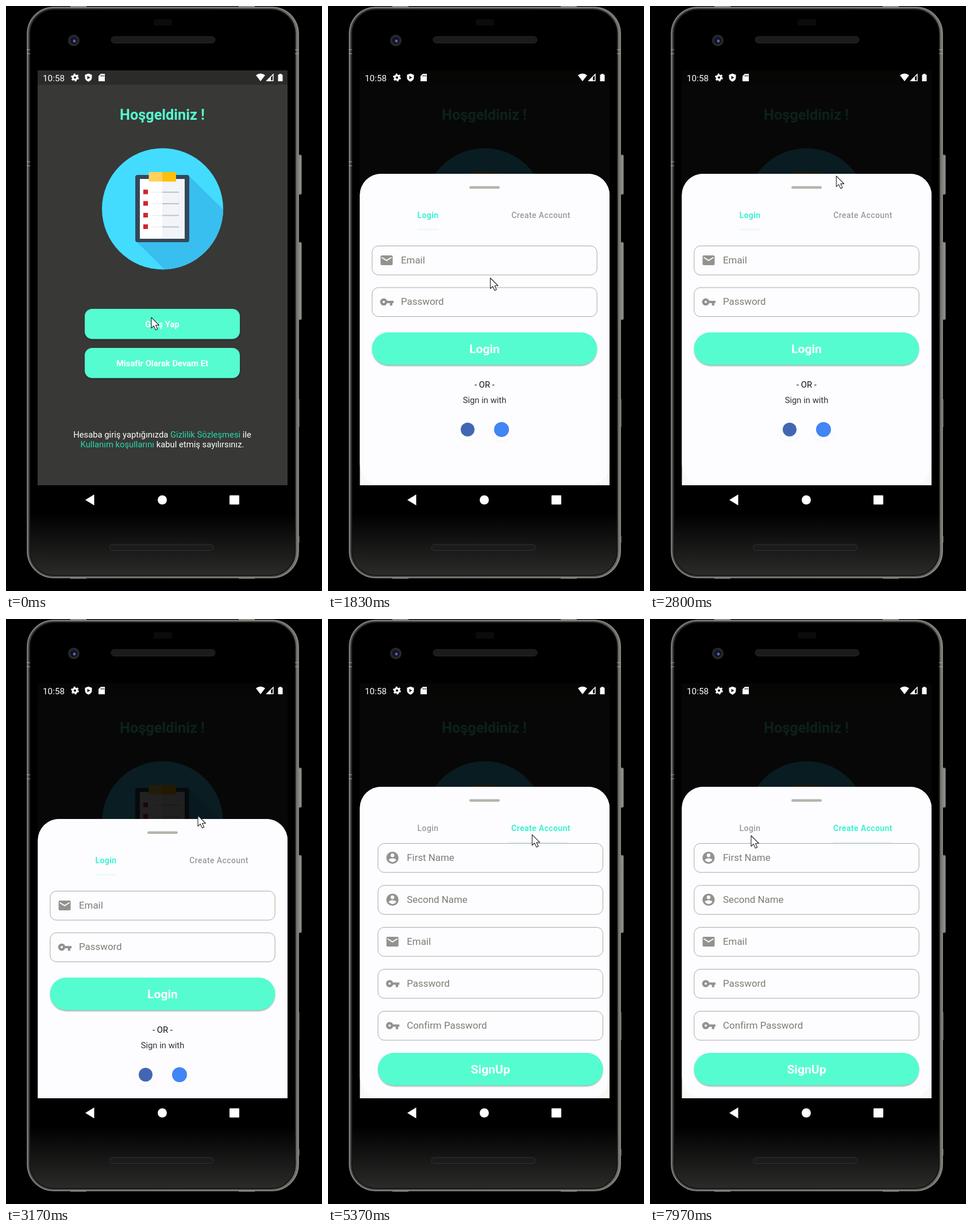
Recreate the animation shown at these times as an HTML page. Size 550 px wide and 1018 px high, loop 8000 ms.

```html
<!DOCTYPE html>
<html lang="tr">
<head>
<meta charset="utf-8">
<title>Login sheet</title>
<style>
  html, body { margin: 0; width: 100%; height: 100%; overflow: hidden; background: #000; }
  svg { display: block; width: 100vw; height: 100vh; font-family: Roboto, "Noto Sans", sans-serif; }
  .mid { text-anchor: middle; }
  .body { font-size: 14.8px; }
  .bold { font-weight: 700; }
  .hint { font-size: 16.9px; fill: #7d7d75; }
  .tab { font-size: 14px; letter-spacing: .4px; }
  .big { font-size: 21.1px; font-weight: 700; fill: #fff; }
</style>
</head>
<body>
<svg id="stage" viewBox="0 0 550 1018"></svg>
<script>
const MINT = '#55fcd0', GREY = '#92928f', SHEET_H = 542, LOOP = 8000;

const rect = (x, y, w, h, r, attrs) => `<rect x="${x}" y="${y}" width="${w}" height="${h}" rx="${r}" ${attrs}/>`;
const fill = c => `fill="${c}"`;
const text = (x, y, cls, str, attrs = '') => `<text x="${x}" y="${y}" class="${cls}" ${attrs}>${str}</text>`;

const icons = {
  mail: y => rect(91.5, y - 8.5, 21, 17, 2, fill(GREY)) +
    `<path d="M93.5 ${y - 5}l8.5 5.4 8.5-5.4" fill="none" stroke="#fdfcff" stroke-width="2"/>`,
  key: y => `<circle cx="97" cy="${y}" r="4.2" fill="none" stroke="${GREY}" stroke-width="4.2"/>
    <path d="M102 ${y - 2.1}h12v4.2h-2.1v4.2h-4.2v-4.2h-5.7z" fill="${GREY}"/>`,
  user: y => `<circle cx="102" cy="${y}" r="10.6" fill="${GREY}"/>
    <circle cx="102" cy="${y - 4.2}" r="3.2" fill="#fdfcff"/>
    <path d="M95.6 ${y + 4.2}c0-4.4 12.8-4.4 12.8 0q-6.4 7-12.8 0z" fill="#fdfcff"/>`
};

const field = (y, icon, label) =>
  rect(76.8, y + .5, 391.4, 50.5, 11, 'fill="none" stroke="#aaa99f"') +
  icons[icon](y + 25.5) + text(127, y + 30.5, 'hint', label);

const pill = (y, label) =>
  rect(77, y + 2, 391, 56.5, 28, 'fill="#9ab5ab" filter="url(#soft)"') +
  rect(76.5, y, 392, 56.5, 28, fill(MINT)) + text(272.5, y + 35.8, 'big mid', label);

const button = (y, label) =>
  rect(138, y + 2, 269, 52, 13, 'fill="#1d2a26" filter="url(#soft)"') +
  rect(137, y, 270, 52.5, 13, fill(MINT)) +
  text(272, y + 32, 'body bold mid', label, fill('#fff'));

const badge = (x, r, color) =>
  `<circle cx="${x}" cy="738" r="19.5" fill="#eaeeee" filter="url(#soft)"/>
   <circle cx="${x}" cy="737" r="20" fill="#fdfcff"/><circle cx="${x}" cy="737" r="${r}" fill="${color}"/>`;

const sideKey = (y, h) => rect(508, y, 6.5, h, 2, 'fill="#8d8d88" stroke="#4a4a48"');

const phone = () => `
  ${sideKey(259, 69)}${sideKey(411, 135)}
  ${rect(507, 684, 4, 49, 1, fill('#4c4c4a'))}${rect(507, 922, 4, 12, 1, fill('#4c4c4a'))}
  ${rect(36, 1, 474, 995, 47, 'fill="url(#metal)"')}
  ${rect(37.5, 2.5, 471, 992, 45.5, 'fill="none" stroke="#8b8b86" stroke-width="1.5"')}
  ${rect(41.5, 6, 462, 985, 42, 'fill="url(#glass)" stroke="#161616" stroke-width="2"')}
  <path d="M36 76h6m-6 7h6m-6 188h6m-6 7h6M503 76h7m-7 7h7" stroke="#a5a5a0"/>
  <path d="M112 1h28M405 1h28M112 995.5h28M405 995.5h28" stroke="#8b8b86" stroke-width="2"/>
  ${rect(257, 23, 32, 11, 3, fill('#0b0b0c'))}
  ${rect(183, 53, 181, 11.5, 5.7, 'fill="#1b1b1b" stroke="#272727"')}
  ${rect(180, 937, 181, 10.5, 5.2, 'fill="#1b1b1b" stroke="#323232"')}
  <circle cx="118" cy="60" r="10" fill="#29292b"/><circle cx="118" cy="60" r="6.5" fill="#131429"/>
  <circle cx="119" cy="61" r="2.4" fill="#5866a8"/>
  ${rect(55, 834, 435, 50, 0, fill('#000'))}
  <path d="M153.5 850v19l-15.5-9.5z" fill="#fff"/><circle cx="272" cy="859.5" r="8" fill="#fff"/>
  ${rect(389, 851.5, 17, 16, 1, fill('#fff'))}`;

const clipboard = () => `
  <circle cx="272.5" cy="353" r="105.5" fill="#43dcff"/>
  <path d="M319 296l120 118-80 80h-47l-86-85z" fill="#39bef0" clip-path="url(#disc)"/>
  ${rect(225, 294, 94, 117, 4, fill('#34485a'))}
  ${rect(233, 301, 39.5, 104, 0, fill('#fff'))}${rect(272, 301, 39, 104, 0, fill('#f1f4f8'))}
  ${rect(248.5, 289, 24, 16.5, 0, fill('#ffd15c'))}${rect(272, 289, 24, 16.5, 0, fill('#fdbf09'))}
  ${[323.5, 343.5, 364, 384].map(y => rect(239, y - 4, 8, 8, 0, fill('#d0262d')) +
    `<path d="M253 ${y + .5}h19" stroke="#e4e6ea"/><path d="M272 ${y + .5}h29" stroke="#bfc2c5" stroke-width="2"/>`).join('')}`;

const welcome = () => `
  ${rect(55, 112, 435, 722, 0, fill('#383836'))}${rect(55, 112, 435, 25, 0, fill('#2b2b2a'))}
  ${text(272, 198, 'bold mid', 'Hoşgeldiniz !', `font-size="25.3" fill="${MINT}"`)}
  ${clipboard()}
  ${button(527, 'Giriş Yap')}${button(595, 'Misafir Olarak Devam Et')}
  <g clip-path="url(#btn)"><circle id="ripple" cx="258" cy="560" fill="#fff"/></g>
  <g fill="#fff">
  ${text(272, 750.5, 'body mid', 'Hesaba giriş yaptığınızda <tspan fill="#27d9ad">Gizlilik Sözleşmesi</tspan> ile')}
  ${text(272, 767.5, 'body mid', '<tspan fill="#27d9ad">Kullanım koşullarını</tspan> kabul etmiş sayılırsınız.')}
  </g>`;

const statusBar = () => `<g fill="#fff">
  ${text(64, 130.5, '', '10:58', 'font-size="15.3"')}
  <circle cx="120" cy="124.5" r="3.7" fill="none" stroke="#fff" stroke-width="3.2"/>
  <circle cx="120" cy="124.5" r="5.9" fill="none" stroke="#fff" stroke-width="2" stroke-dasharray="3.09"/>
  <path d="M143.5 117.5l6 2.3v4.5q0 5-6 7.5-6-2.5-6-7.5v-4.5z"/>
  <path d="M141.5 121.5v6l5-3z" fill="#222"/>
  <path d="M165 118h7v13h-11v-9z"/><path d="M165.5 120v3m2.3-3v3m2.3-3v3" stroke="#222"/>
  <path d="M435 120.5q8-6 16 0l-8 10.500z"/>
  <path d="M465 119v11h-11z" fill="none" stroke="#fff" stroke-width="1.5"/><path d="M461 123v8h-7z"/>
  <path d="M473.5 119.5h2v-1.5h4v1.5h2v11.5h-8z"/></g>`;

const loginForm = () => `${field(417, 'mail', 'Email')}${field(489.5, 'key', 'Password')}${pill(568, 'Login')}
  ${text(272.5, 663.5, 'body mid', '- OR -', fill('#111'))}${text(272.5, 691, 'body mid', 'Sign in with', fill('#333'))}
  ${badge(243, 12, '#4267b2')}${badge(302, 13, '#4285f4')}`;

const signupForm = () => [['user', 'First Name'], ['user', 'Second Name'], ['mail', 'Email'],
  ['key', 'Password'], ['key', 'Confirm Password']].map(([icon, label], i) => field(390 + 73 * i, icon, label)).join('') +
  pill(755, 'SignUp');

const sheet = () => `
  <path d="M55.5 834V329a37 37 0 0 1 37-37H453a37 37 0 0 1 37 37V834z" fill="#f8f9f5"/>
  ${rect(55.5, 292, 434.5, SHEET_H, 37, fill('#fdfcff'))}
  ${rect(246, 313.5, 53, 4.5, 2.2, fill('#b5b5ad'))}
  ${text(174, 369, 'tab mid', 'Login', 'id="tabA"')}${text(370.5, 369, 'tab mid', 'Create Account', 'id="tabB"')}
  <rect id="bar" y="388" height="1.5" fill="#dcfaf4"/>
  <g clip-path="url(#view)"><g id="login">${loginForm()}</g><g id="signup">${signupForm()}</g></g>`;

const clip = (id, shape) => `<clipPath id="${id}">${shape}</clipPath>`;
const stops = list => list.map(([at, c]) => `<stop offset="${at}" stop-color="${c}"/>`).join('');
document.getElementById('stage').innerHTML = `<defs>
  ${clip('screen', rect(55, 112, 435, 722, 0, ''))}${clip('view', rect(55, 389.7, 435, 445, 0, ''))}
  ${clip('disc', '<circle cx="272.5" cy="353" r="105.5"/>')}${clip('btn', rect(137, 527, 270, 52.5, 13, ''))}
  <filter id="soft" x="-20%" y="-20%" width="140%" height="140%"><feGaussianBlur stdDeviation="1.3"/></filter>
  <linearGradient id="metal">${stops([[0, '#4a4a48'], [.9, '#55554f'], [1, '#73736e']])}</linearGradient>
  <linearGradient id="glass" x2="0" y2="1">${stops([[0, '#000'], [.89, '#000'], [1, '#2b2b2a']])}</linearGradient>
  </defs>
  ${phone()}
  <g clip-path="url(#screen)">${welcome()}
    ${rect(55, 112, 435, 722, 0, 'id="dim"')}
    <g id="sheet">${sheet()}</g></g>
  ${statusBar()}
  <path id="cursor" d="M0 0v18.5l4.3-3.8 3.2 7 3.2-1.5-3.1-6.7h5.8z" fill="#fff" stroke="#222" stroke-width="1.1" stroke-linejoin="round"/>`;

const el = Object.fromEntries(['ripple', 'dim', 'sheet', 'tabA', 'tabB', 'bar', 'login', 'signup', 'cursor']
  .map(id => [id, document.getElementById(id)]));

const clamp = v => Math.min(1, Math.max(0, v));
const mix = (a, b, p) => a + (b - a) * p;
const bezier = (x1, y1, x2, y2) => x => {
  const at = (a, b, s) => 3 * (1 - s) ** 2 * s * a + 3 * (1 - s) * s * s * b + s ** 3;
  let lo = 0, hi = 1;
  for (let i = 0; i < 20; i++) {
    const m = (lo + hi) / 2;
    if (at(x1, x2, m) < x) lo = m; else hi = m;
  }
  return at(y1, y2, lo);
};
const ease = bezier(.25, .1, .25, 1), settle = bezier(0, 0, .2, 1);

// Rows are [time, ...values]; values glide from one row to the next.
const track = (rows, t) => {
  const i = rows.findIndex(r => r[0] > t);
  if (i < 1) return rows[i ? rows.length - 1 : 0].slice(1);
  const a = rows[i - 1], b = rows[i], p = (t - a[0]) / (b[0] - a[0]);
  return a.slice(1).map((v, k) => mix(v, b[k + 1], p * p * (3 - 2 * p)));
};

const pointer = [[0, 253, 542], [200, 255, 550], [530, 255, 550], [700, 258, 560], [1150, 258, 560], [1300, 262, 545],
  [1470, 262, 545], [2270, 310, 377], [2500, 311, 472], [2850, 325, 286], [3170, 334, 342], [3290, 335, 360],
  [3560, 330, 282], [3930, 310, 330], [4600, 281, 411], [4770, 288, 405], [5050, 362, 364], [5300, 362, 364],
  [5800, 240, 570], [6200, 221, 530], [6470, 219, 520], [6900, 222, 490], [7300, 215, 500], [7550, 205, 535], [7970, 176, 377]];
const drag = [[2270, 0], [2500, 95], [2760, 0], [2900, 0], [3170, 56], [3290, 74], [3530, 0]];
const scroll = [[5850, 0], [6150, 14], [7320, 14], [7520, 0]];

const move = (node, x, y) => node.setAttribute('transform', `translate(${x} ${y})`);
const paintTab = (node, p) => {
  node.setAttribute('fill', `rgb(${mix(154, 60, p)},${mix(154, 245, p)},${mix(158, 208, p)})`);
  node.setAttribute('font-weight', p > .5 ? 700 : 500);
};

function draw(t) {
  const opening = clamp((t - 837) / 250), [pull] = track(drag, t);
  move(el.sheet, 0, (1 - settle(opening)) * SHEET_H + pull);
  el.dim.setAttribute('opacity', .87 * ease(opening * (1 - pull / SHEET_H)));

  const splash = clamp((t - 720) / 250);
  el.ripple.setAttribute('r', 170 * splash);
  el.ripple.setAttribute('opacity', t < 720 ? 0 : .25 * (1 - splash));

  const swap = ease(clamp((t - 5130) / 300));
  move(el.login, -434.5 * swap, 0);
  move(el.signup, 434.5 * (1 - swap), -track(scroll, t)[0]);
  paintTab(el.tabA, 1 - swap);
  paintTab(el.tabB, swap);
  el.bar.setAttribute('x', mix(156, 319, swap));
  el.bar.setAttribute('width', mix(36, 102.5, swap));

  move(el.cursor, ...track(pointer, t));
}

const start = performance.now();
(function tick() {
  draw((performance.now() - start) % LOOP);
  requestAnimationFrame(tick);
})();
</script>
</body>
</html>
```
